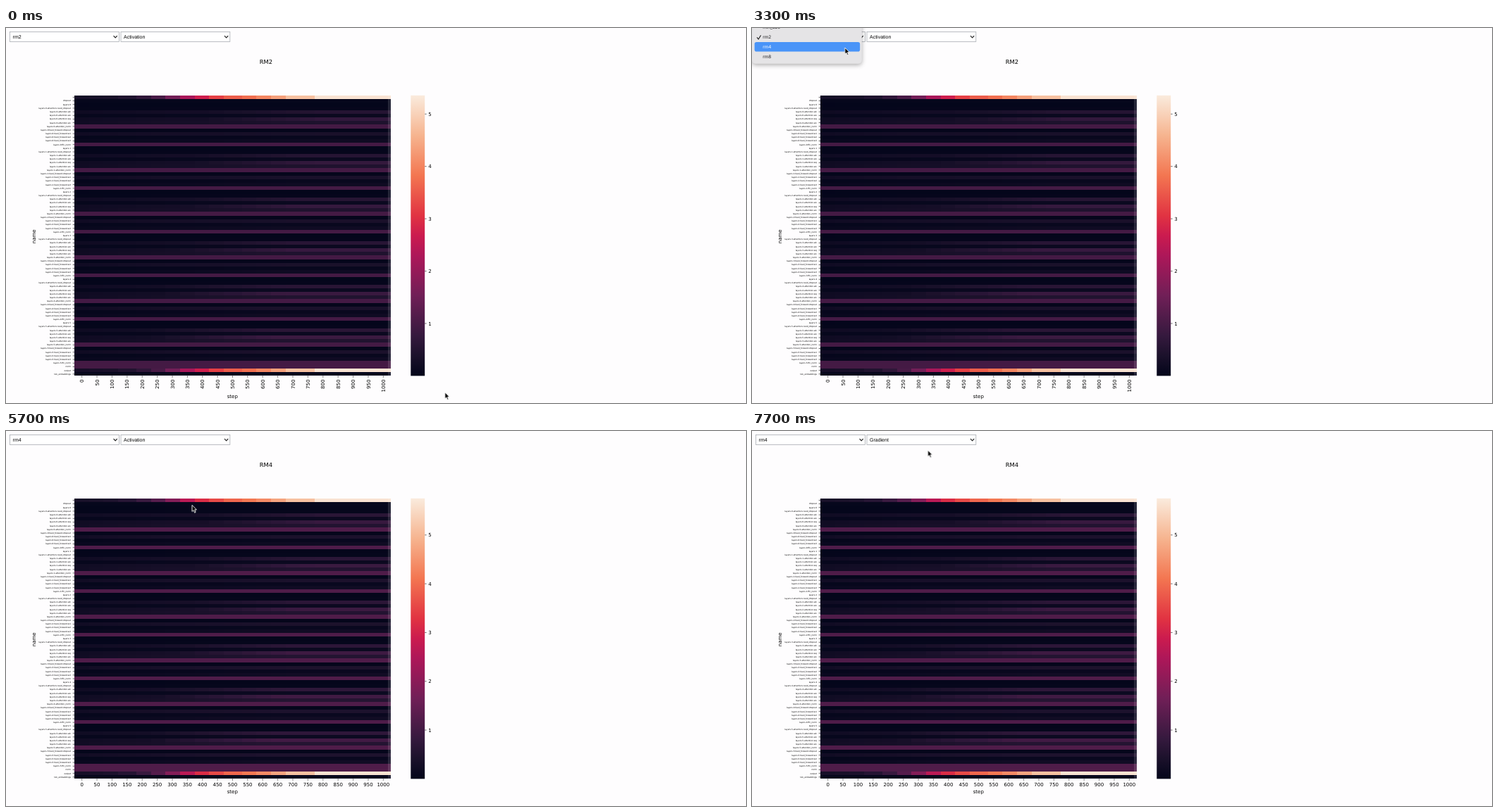
An HTML page with a canvas that plays this animation: 1050x533 px, repeating every 8000 ms.

```html
<!DOCTYPE html>
<html lang="en">
<head>
<meta charset="utf-8">
<title>Activation heatmap</title>
<style>
  html, body { margin: 0; width: 100%; height: 100%; overflow: hidden; background: #fefdfe; }
  canvas, svg { position: absolute; }
  canvas { left: 97px; top: 95.8px; width: 449px; height: 398.6px; image-rendering: pixelated; }
  svg { left: 0; top: 0; width: 1050px; height: 533px; }
  text { font: 7px "DejaVu Sans", sans-serif; text-rendering: geometricPrecision; }
  .title { font-size: 8.35px; }
  .row { font-size: 2.85px; }
  .mid { text-anchor: middle; }
  .end { text-anchor: end; }
  .tick { stroke: #000; stroke-width: .6; }
  .select rect { fill: #fff; stroke: #a9adb3; stroke-width: .8; }
  .select text { font: 7px "Liberation Sans", Arial, sans-serif; }
  .mark { fill: none; stroke: #222; stroke-width: 1.2; stroke-linecap: round; stroke-linejoin: round; }
  .popup { filter: drop-shadow(0 2px 3px rgba(0, 0, 0, .32)); }
  .popup text { font: 6.4px Inter, sans-serif; fill: #1c1c1e; }
  .hot rect { fill: #4994f8; }
  .hot text { fill: #fff; }
  .hot .mark { stroke: #fff; }

  /* hard switches, 8 s loop */
  .sw { animation: 8s step-end infinite; }
  .plot2 { animation-name: plot2; }
  .plot4 { animation-name: plot4; }
  .rm2 { animation-name: rm2; }
  .rm4 { animation-name: rm4; }
  .act { animation-name: act; }
  .grad { animation-name: grad; }
  .models { animation-name: models; }
  .kinds { animation-name: kinds; }
  .m-old { animation-name: mOld; }
  .m-new { animation-name: mNew; }
  .k-old { animation-name: kOld; }
  .k-new { animation-name: kNew; }
  @keyframes plot2 { 0% { opacity: 1 } 65%, to { opacity: 0 } }
  @keyframes plot4 { 0% { opacity: 0 } 65%, to { opacity: 1 } }
  @keyframes rm2 { 0% { opacity: 1 } 43.75%, to { opacity: 0 } }
  @keyframes rm4 { 0% { opacity: 0 } 43.75%, to { opacity: 1 } }
  @keyframes act { 0% { opacity: 1 } 91.25%, to { opacity: 0 } }
  @keyframes grad { 0% { opacity: 0 } 91.25%, to { opacity: 1 } }
  @keyframes models { 0% { opacity: 0 } 32.5% { opacity: 1 } 43.75%, to { opacity: 0 } }
  @keyframes kinds { 0% { opacity: 0 } 82.5% { opacity: 1 } 91.25%, to { opacity: 0 } }
  @keyframes mOld { 0% { opacity: 1 } 37.5%, to { opacity: 0 } }
  @keyframes mNew { 0% { opacity: 0 } 37.5%, to { opacity: 1 } }
  @keyframes kOld { 0% { opacity: 1 } 86.25%, to { opacity: 0 } }
  @keyframes kNew { 0% { opacity: 0 } 86.25%, to { opacity: 1 } }

  /* pointer advances every 100 ms */
  .pointer { stroke: #fff; stroke-width: .9; stroke-linejoin: round; animation: pointer 8s step-end infinite; }
  @keyframes pointer {
    0% { transform: translate(622.8px, 517.8px) }
    3.75% { transform: translate(622.8px, 517.8px); animation-timing-function: steps(3) }
    7.5% { transform: translate(429px, 236px) }
    8.75% { transform: translate(429px, 236px); animation-timing-function: steps(8) }
    18.75% { transform: translate(108px, -4px); animation-timing-function: steps(1) }
    20% { transform: translate(107.3px, -5.5px) }
    25% { transform: translate(107.3px, -5.5px); animation-timing-function: steps(4) }
    30% { transform: translate(106.5px, 10px) }
    35% { transform: translate(106.5px, 10px); animation-timing-function: steps(4) }
    40% { transform: translate(131.8px, 28px) }
    43.75% { transform: translate(131.8px, 28px); animation-timing-function: steps(5) }
    50% { transform: translate(258px, 100px) }
    52.5% { transform: translate(264px, 105.3px) }
    73.75% { transform: translate(264px, 105.3px); animation-timing-function: steps(7) }
    82.5% { transform: translate(253px, 12px) }
    85% { transform: translate(253px, 12px); animation-timing-function: steps(2) }
    87.5% { transform: translate(251.8px, 25.3px) }
    91.25% { transform: translate(251.8px, 25.3px); animation-timing-function: steps(2) }
    93.75%, to { transform: translate(249.5px, 27.3px) }
  }
</style>
</head>
<body>
<script>
const LEFT = 97, TOP = 95.8, WIDTH = 449, HEIGHT = 398.6;
const COLS = 21, STEP = 50, LAYERS = 6;

// Colour map stops: position in fourteenths, colour
const STOPS = [
  [0, '03051a'], [1, '1b112b'], [2, '35193e'], [4, '701f57'], [6, 'ad1759'], [7, 'cb1b4f'],
  [8, 'e13342'], [10, 'f37651'], [12, 'f6b48f'], [14, 'faebdd'],
];

// Parts of one layer: name, base level, rise over training
const PARTS = [
  ['', .004, 0], ['.attention.resid_dropout', .008, 0], ['.attention.wk', .05, .05],
  ['.attention.wo', .015, .008], ['.attention.wq', .05, .085], ['.attention.wv', .055, .025],
  ['.attention_norm', 'norm', 0], ['.feed_forward.dropout', .005, 0],
  ['.feed_forward.w1', .055, .012], ['.feed_forward.w2', .012, .005],
  ['.feed_forward.w3', .025, .01], ['.ffn_norm', 'norm', 0],
];

const MODELS = [
  { id: '2', max: 5.356, norm: .178, gain: 1, upright: true,
    out: [.055, .06, .065, .085, .125, .19, .29, .42, .51, .6, .66, .70, .75, .81, .89] },
  { id: '4', max: 5.75, norm: .205, gain: 1.12, upright: false,
    out: [.06, .065, .075, .1, .15, .22, .33, .46, .55, .62, .68, .72, .76, .82, .89] },
];

const clamp = (v) => Math.min(1, Math.max(0, v));
const range = (n, f) => Array.from({ length: n }, (_, i) => f(i));
const text = (x, y, s, cls = '', extra = '') => `<text x="${x}" y="${y}" class="${cls}" ${extra}>${s}</text>`;
const tick = (x1, y1, x2, y2) => `<path class="tick" d="M${x1} ${y1}L${x2} ${y2}"/>`;
const group = (cls, s) => `<g class="${cls}">${s}</g>`;

function colour(level) {
  const p = clamp(level) * 14;
  const i = Math.max(1, STOPS.findIndex(([at]) => at >= p));
  const [[a, from], [b, to]] = [STOPS[i - 1], STOPS[i]];
  const part = (hex, k) => parseInt(hex.substr(k * 2, 2), 16);
  const mix = [0, 1, 2].map(k => Math.round(part(from, k) + (part(to, k) - part(from, k)) * (p - a) / (b - a)));
  return `rgb(${mix})`;
}

function makeRows(m) {
  const out = c => m.out[c] ?? (c < 16 ? .89 : .98);
  const flat = v => () => v;
  const layer = n => PARTS.map(([name, base, rise]) => ({
    name: `layers.${n}${name}`,
    level: c => base === 'norm' ? m.norm
      : m.gain * (base * (.7 + .3 * clamp(c / 6)) + rise * (1 + n * .05) * clamp((c - 8 + n * .7) / 8)),
  }));
  return [
    { name: '', level: out }, { name: 'dropout', level: flat(.01) },
    ...range(LAYERS, layer).flat(),
    { name: 'norm', level: flat(m.norm) }, { name: 'output', level: out },
    { name: 'tok_embeddings', level: flat(.008) },
  ];
}

function heatmap(m, rows) {
  const canvas = document.createElement('canvas');
  canvas.width = COLS;
  canvas.height = rows.length;
  canvas.className = `sw plot${m.id}`;
  const ctx = canvas.getContext('2d');
  rows.forEach((row, y) => range(COLS, x => {
    ctx.fillStyle = colour(row.level(x));
    ctx.fillRect(x, y, 1, 1);
  }));
  document.body.append(canvas);
}

function axes(m, rows) {
  const bottom = TOP + HEIGHT;
  const rowLabels = rows.map(({ name }, i) => {
    const y = TOP + (i + .5) * HEIGHT / rows.length;
    return tick(94.7, y, LEFT, y) + text(92, y + .9, name, 'row end');
  });
  const steps = range(COLS, i => {
    const x = LEFT + (i + .5) * WIDTH / COLS;
    const label = m.upright
      ? text(0, 0, i * STEP, 'end', `transform="translate(${x + 2.6} 499.6) rotate(-90)"`)
      : text(x, 505.3, i * STEP, 'mid');
    return tick(x, bottom, x, bottom + 2.4) + label;
  });
  const scale = range(5, i => {
    const y = bottom - (i + 1) * HEIGHT / m.max;
    return tick(594.2, y, 596.6, y) + text(599.3, y + 2.6, i + 1);
  });
  return group(`sw plot${m.id}`, [
    text(368.8, 51, 'RM' + m.id, 'title mid'),
    text(321.3, m.upright ? 525.8 : 515.2, 'step', 'mid'),
    text(0, 0, 'name', 'mid', 'transform="translate(41.9 296.3) rotate(-90)"'),
    ...rowLabels, ...steps, ...scale,
  ].join(''));
}

const select = (x, values) => group('select',
  `<rect x="${x}" y="5.6" width="154.8" height="13.8"/>` +
  values.map(([cls, s]) => text(x + 4, 15.1, s, 'sw ' + cls)).join('') +
  `<path class="mark" d="M${x + 147.3} 11.4l2.3 2.4 2.3-2.4"/>`);

// One menu line, plus its highlighted copy when a class is given
function item(x, y, s, hot, checked) {
  const check = checked ? `<path class="mark" d="M${x + 7.3} ${y + .7}l1.8 2.3 3.2-5.2"/>` : '';
  const line = check + text(x + 15.2, y + 2.2, s);
  const bar = `<rect x="${x + 3.6}" y="${y - 6.8}" width="149.6" height="13.6" rx="2.8"/>`;
  return line + (hot ? group(`hot sw ${hot}`, bar + line) : '');
}

const popup = (cls, x, y, height, items) => group(`popup sw ${cls}`,
  `<rect x="${x}" y="${y}" width="155.8" height="${height}" rx="5" fill="#e5e4e6"/>` + items.join(''));

const gradient = STOPS.map(([at, hex]) => `<stop offset="${at / 14}" stop-color="#${hex}"/>`).join('');
const plots = MODELS.map(m => {
  const rows = makeRows(m);
  heatmap(m, rows);
  return axes(m, rows);
}).join('');

document.body.insertAdjacentHTML('beforeend', `<svg viewBox="0 0 1050 533">
  <defs><linearGradient id="scale" x1="0" y1="1" x2="0" y2="0">${gradient}</linearGradient></defs>
  ${plots}
  <rect x="574.3" y="${TOP}" width="19.9" height="${HEIGHT}" fill="url(#scale)"/>
  ${select(5.6, [['rm2', 'rm2'], ['rm4', 'rm4']])}
  ${select(163, [['act', 'Activation'], ['grad', 'Gradient']])}
  ${popup('models', 0, -30, 80.8, [
    item(0, -.8, 'min_abs'), item(0, 13, 'rm2', 'm-old', true),
    item(0, 26.8, 'rm4', 'm-new'), item(0, 40.4, 'rm8')])}
  ${popup('kinds', 157.4, 3, 33.8, [
    item(157.4, 13, 'Activation', 'k-old', true), item(157.4, 27, 'Gradient', 'k-new')])}
  <path class="pointer" d="M0 0V9.2L2.1 7.3 3.6 10.8 5.2 10.1 3.7 6.7H6.5Z"/>
</svg>`);
</script>
</body>
</html>
```
